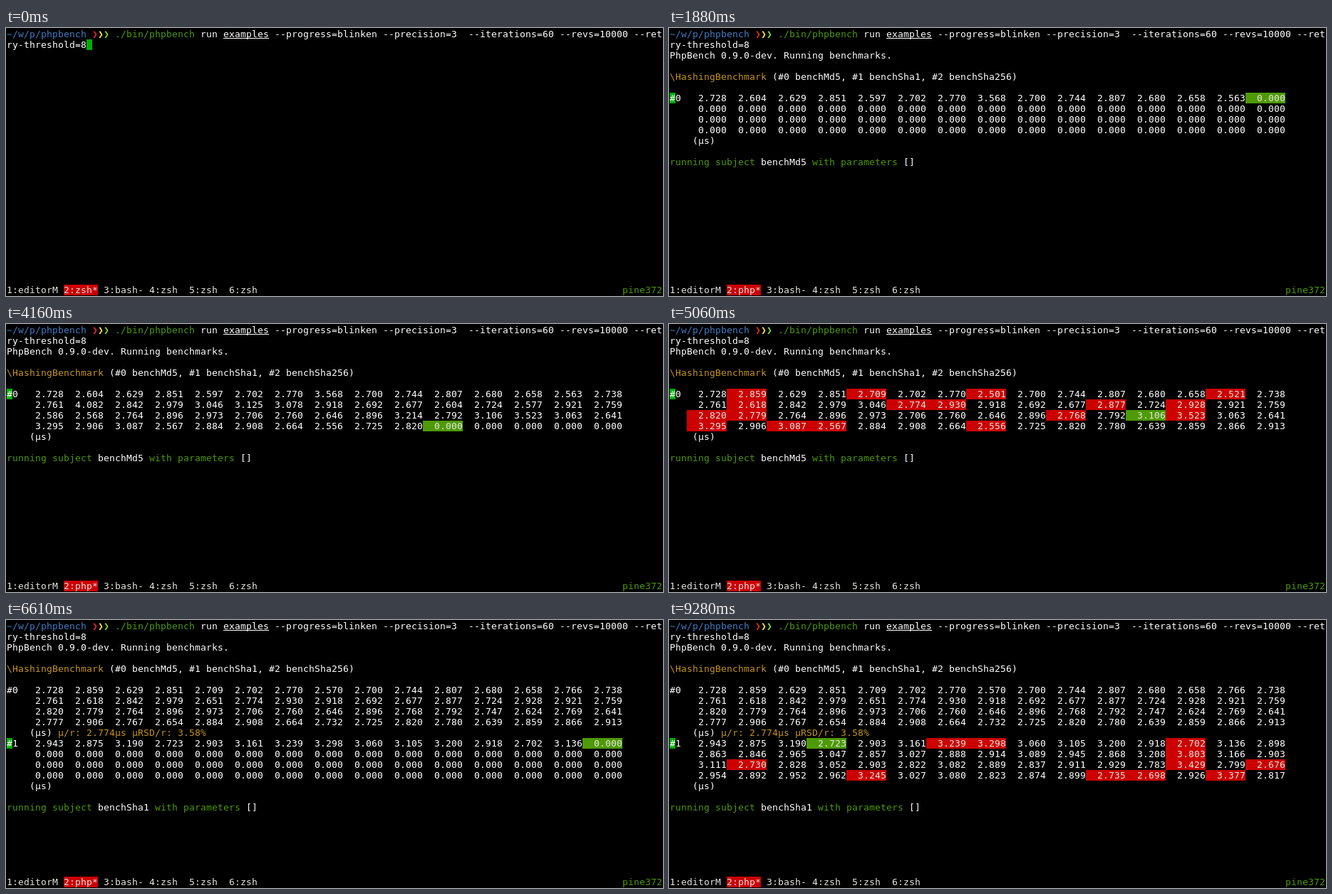
Recreate the animation shown at these times as an HTML page. Size 922 by 377 pixels, loop 9.3 s.

```html
<!DOCTYPE html>
<html lang="en">
<head>
<meta charset="utf-8">
<title>Benchmark run in a terminal</title>
<style>
html, body { margin: 0; width: 100%; height: 100%; overflow: hidden; background: #000; }
svg { display: block; width: 922px; height: 377px; }
text { font: 13px "DejaVu Sans Mono", monospace; white-space: pre; }
.bold { font-weight: bold; }
</style>
</head>
<body>
<svg id="screen" viewBox="0 0 922 377"></svg>
<script>
const LOOP = 9300, ENTER = 350, RUN = 1150;
const CELL_W = 8, CELL_H = 15, ORIGIN = 1;
const WHITE = '#fff', PALE = '#e3e6df', GREEN = '#4e9a06', RED = '#cc0000',
      YELLOW = '#c4941a', BLUE = '#3f7cc4', CURSOR = '#00ad00';

const words = s => s.trim().split(/\s+/);
const pass = (cells, values) => ({ cells: words(cells).map(Number), values: words(values) });
const firstPass = values => ({ cells: [...Array(60).keys()], values: words(values) });

// Each bench runs all cells once, then repeats the rejected ones.
const benches = [
  {
    name: 'benchMd5', row: 6, first: 0,
    summary: 'µ/r: 2.774µs µRSD/r: 3.58%',
    passes: [
      firstPass(`
        2.728 2.604 2.629 2.851 2.597 2.702 2.770 3.568 2.700 2.744 2.807 2.680 2.658 2.563 2.738
        2.761 4.082 2.842 2.979 3.046 3.125 3.078 2.918 2.692 2.677 2.604 2.724 2.577 2.921 2.759
        2.586 2.568 2.764 2.896 2.973 2.706 2.760 2.646 2.896 3.214 2.792 3.106 3.523 3.063 2.641
        3.295 2.906 3.087 2.567 2.884 2.908 2.664 2.556 2.725 2.820 2.780 2.639 2.859 2.866 2.913`),
      pass('1 4 7 13 16 20 21 25 27 30 31 39 41 42 45 47 48 52',
        `2.859 2.709 2.501 2.521 2.618 2.774 2.930 2.877 2.928
         2.820 2.779 2.768 2.747 3.311 2.777 2.767 2.654 2.732`),
      pass('7 13 19 42 43', '2.507 2.530 2.651 2.624 2.769'),
      pass('7 13', '3.012 2.766'),
      pass('7', '2.570')
    ]
  },
  {
    name: 'benchSha1', row: 11, first: 86,
    passes: [
      firstPass(`
        2.943 2.875 3.190 2.723 2.903 3.161 3.239 3.298 3.060 3.105 3.200 2.918 2.702 3.136 2.898
        2.863 2.846 2.965 3.047 2.857 3.027 2.888 2.914 3.089 2.945 2.868 3.208 3.803 3.166 2.903
        3.111 2.730 2.828 3.052 2.903 2.822 3.082 2.889 2.837 2.911 2.929 2.783 3.429 2.799 2.676
        2.954 2.892 2.952 2.962 3.245 3.027 3.080 2.823 2.874 2.899 2.735 2.698 2.926 3.377 2.817`),
      pass('3 6 7 12 27 31 42 44 49 55 56 58', '2.723')
    ]
  }
];

// Time in ms against the number of measurements made.
const pace = [[1160, 0], [1880, 14], [3160, 37], [4400, 60], [5060, 72],
              [5870, 86], [6610, 100], [8020, 124], [9280, 146], [9340, 147]];

function stepAt(t) {
  if (t <= pace[0][0]) return 0;
  const i = pace.findIndex(p => t < p[0]);
  const [t0, n0] = pace[i - 1], [t1, n1] = pace[i];
  return Math.floor(n0 + (n1 - n0) * (t - t0) / (t1 - t0) + 1e-6);
}

const px = col => ORIGIN + col * CELL_W;
const py = row => ORIGIN + row * CELL_H;

function block(row, col, length, fill) {
  return `<rect x="${px(col)}" y="${py(row)}" width="${length * CELL_W}" height="${CELL_H}" fill="${fill}"/>`;
}

function print(row, col, str, fill = WHITE, cls = '') {
  const xs = [...str].map((_, i) => px(col + i)).join(' ');
  return `<text x="${xs}" y="${py(row) + 12}" fill="${fill}" class="${cls}">${str}</text>`;
}

// Runs of [text, colour, class] set one after another.
function line(row, runs, col = 0) {
  return runs.map(([str, fill, cls]) => {
    const out = print(row, col, str, fill, cls);
    col += str.length;
    return out;
  }).join('');
}

function prompt() {
  return line(0, [
    ['~/w/p/phpbench ', BLUE], ['❯', '#ef2929', 'bold'], ['❯', '#fce94f', 'bold'],
    ['❯', '#8ae234', 'bold'], [' ./bin/phpbench', GREEN],
    [' run examples --progress=blinken --precision=3  --iterations=60 --revs=10000 --ret']
  ]) + print(1, 0, 'ry-threshold=8') +
    `<rect x="${px(38)}" y="14" width="${8 * CELL_W}" height="1" fill="${WHITE}"/>`;
}

function statusBar(job) {
  return block(24, 10, 6, RED) +
    line(24, [[`1:editorM 2:${job}* 3:bash- 4:zsh  5:zsh  6:zsh`, PALE]]) +
    print(24, 108, 'pine372', GREEN);
}

// Values, rejects and the active cell after a number of steps.
function tableState(bench, steps) {
  const values = Array(60).fill('0.000');
  for (const [i, { cells, values: results }] of bench.passes.entries()) {
    const done = Math.min(steps, cells.length);
    for (let k = 0; k < done; k++) values[cells[k]] = results[k];
    if (steps < cells.length) return { values, active: cells[steps], rejects: i ? cells : [] };
    steps -= cells.length;
  }
  return { values, active: -1, rejects: [] };
}

function table(bench, id, step) {
  const { values, active, rejects } = tableState(bench, step - bench.first);
  const running = active >= 0, unitRow = bench.row + 4;
  let out = running ? block(bench.row, 0, 1, CURSOR) : '';
  out += print(bench.row, 0, '#' + id);
  values.forEach((value, i) => {
    const row = bench.row + Math.floor(i / 15), col = 3 + i % 15 * 7;
    const back = i === active ? GREEN : rejects.includes(i) ? RED : null;
    if (back) out += block(row, col, 7, back);
    out += print(row, col + 2, value, back ? PALE : WHITE);
  });
  out += print(unitRow, 4, '(µs)');
  if (!running) return out + print(unitRow, 9, bench.summary, YELLOW);
  return out + line(unitRow + 2, [
    ['running subject ', GREEN], [bench.name], [' with parameters ', GREEN], ['[]']
  ]);
}

function report(step) {
  return print(2, 0, 'PhpBench 0.9.0-dev. Running benchmarks.') +
    line(4, [['\\HashingBenchmark', YELLOW], [' (#0 benchMd5, #1 benchSha1, #2 benchSha256)']]) +
    benches.map((b, id) => step >= b.first ? table(b, id, step) : '').join('');
}

const screen = document.getElementById('screen');
const start = performance.now();
let shown;

function draw(t) {
  const step = t < ENTER ? -2 : t < RUN ? -1 : stepAt(t);
  if (step === shown) return;
  shown = step;
  const waiting = step < 0;
  const cursor = step === -2 ? block(1, 14, 1, CURSOR) : block(2, 0, 1, CURSOR);
  screen.innerHTML = '<rect width="922" height="377"/>' + prompt() +
    (waiting ? cursor : report(step)) + statusBar(waiting ? 'zsh' : 'php');
}

function tick() {
  draw((performance.now() - start) % LOOP);
  requestAnimationFrame(tick);
}
tick();
</script>
</body>
</html>
```
